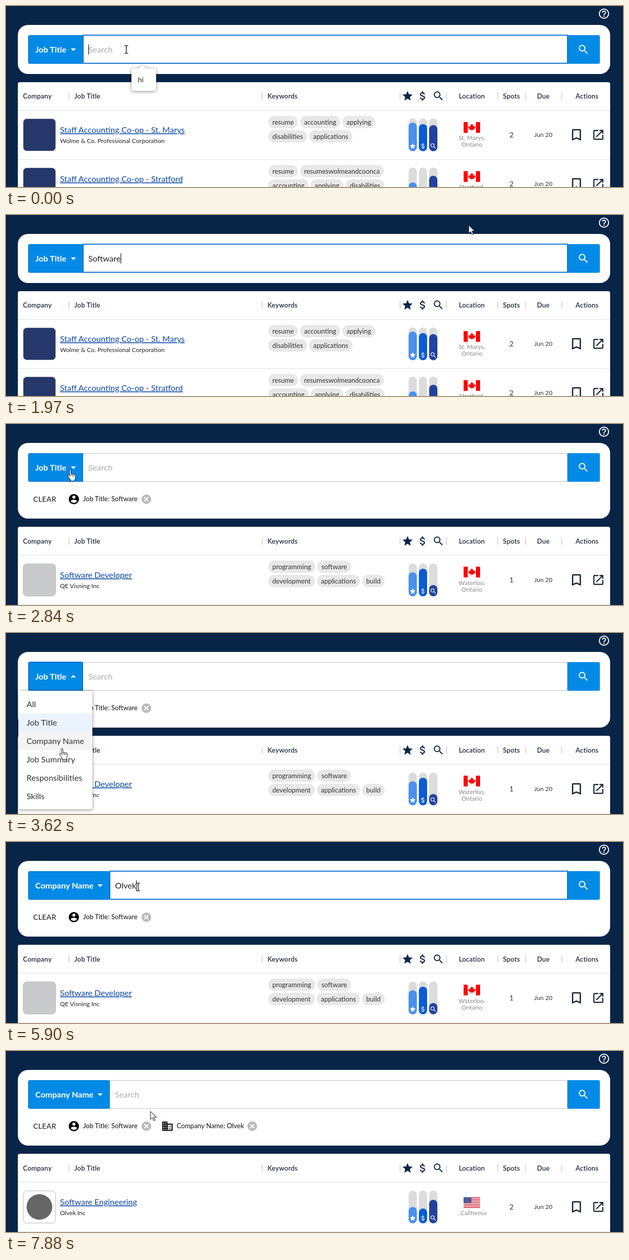
An HTML page for the animation above (8000 ms loop, 1200 px wide and 354 px high).

```html
<!DOCTYPE html>
<html lang="en">
<head>
<meta charset="utf-8">
<title>Job search</title>
<style>
  html, body { margin: 0; width: 100%; height: 100%; overflow: hidden; background: #082548; }
  svg { display: block; font-family: Lato, sans-serif; }
  .pop { filter: drop-shadow(0 1px 3px #0007); }
</style>
</head>
<body>
<svg id="stage" width="1200" height="354" viewBox="0 0 1200 354"></svg>
<script>
const LOOP = 8000, NAVY = '#082548', BLUE = '#028ae6', FOCUS = '#1976d2';
const stage = document.getElementById('stage');
const pen = document.createElement('canvas').getContext('2d');

// Icons on a 24 x 24 grid
const ICONS = {
  star: '<path d="M12 17.27 18.18 21l-1.64-7.03L22 9.24l-7.19-.61L12 2 9.19 8.63 2 9.24l5.46 4.73L5.82 21z"/>',
  dollar: '<path d="M11.8 10.9c-2.27-.59-3-1.2-3-2.15 0-1.09 1.01-1.85 2.7-1.85 1.78 0 2.44.85 2.5 2.1h2.21c-.07-1.72-1.12-3.3-3.21-3.81V3h-3v2.16c-1.94.42-3.5 1.68-3.5 3.61 0 2.31 1.91 3.46 4.7 4.13 2.5.6 3 1.48 3 2.41 0 .69-.49 1.79-2.7 1.79-2.06 0-2.87-.92-2.98-2.1h-2.2c.12 2.19 1.76 3.42 3.68 3.83V21h3v-2.15c1.95-.37 3.5-1.5 3.5-3.55 0-2.84-2.43-3.81-4.7-4.4z"/>',
  search: '<path d="M14.2 14.2 19.8 19.8M15 9.5a5.5 5.5 0 1 1-11 0a5.5 5.5 0 0 1 11 0z" fill="none" stroke="currentColor" stroke-width="2"/>',
  help: '<circle cx="12" cy="12" r="9" fill="none" stroke="currentColor" stroke-width="2"/><path d="M11 18h2v-2h-2zM12 6c-2.21 0-4 1.79-4 4h2c0-1.1.9-2 2-2s2 .9 2 2c0 2-3 1.75-3 5h2c0-2.25 3-2.5 3-5 0-2.21-1.79-4-4-4z"/>',
  bookmark: '<path d="M6 19.5V5q0-1 1-1h10q1 0 1 1v14.5l-6-2.6z" fill="none" stroke="currentColor" stroke-width="2"/>',
  open: '<path d="M12 4H5q-1 0-1 1v14q0 1 1 1h14q1 0 1-1v-7M14 4h6v6M20 4 8.5 15.5" fill="none" stroke="currentColor" stroke-width="2"/>',
  person: '<path fill-rule="evenodd" d="M12 2a10 10 0 1 0 0 20a10 10 0 0 0 0-20zm0 3a3 3 0 1 1 0 6a3 3 0 0 1 0-6zm0 14.2c-2.5 0-4.71-1.28-6-3.22.03-1.99 4-3.08 6-3.08s5.97 1.09 6 3.08c-1.29 1.94-3.5 3.22-6 3.22z"/>',
  office: '<path d="M2 3h10v4h10v14H2z"/><path d="M5 5v14M9 5v14" stroke="#fff" stroke-width="2" stroke-dasharray="2"/><path d="M12 9h8v10h-8v-2h2v-2h-2v-2h2v-2h-2z" fill="#fff"/><path d="M16 11h2v2h-2zm0 4h2v2h-2z"/>',
  cancel: '<circle cx="12" cy="12" r="9.3"/><path d="m8 8 8 8m0-8-8 8" stroke="#fff" stroke-width="2"/>',
  down: '<path d="m7 10 5 5 5-5z"/>',
  up: '<path d="m7 14 5-5 5 5z"/>'
};

const CURSORS = {
  beam: '<path d="M-3.5-7.5h3M.5-7.5h3M0-7V7M-3.5 7.5h3M.5 7.5h3" stroke="#111" stroke-width="1.4"/>',
  hand: '<path d="M-1.5 1c0-2 3-2 3 0v7c0-1 3-1.2 3 .4 0-1 2.8-1 2.8.6 0-1 2.8-.8 2.8 1v4c0 3-1.5 4-1.5 6.5v1h-8v-1.5c0-2-3.6-5-5.6-8.5-.8-1.8 1.4-2.4 2.4-1.2l1.1 1.5z" fill="#fff" stroke="#111"/><path d="M1.5 8v4M4.5 9v3.5M7.3 9.5v3" stroke="#111"/>',
  arrow: '<path d="M0 0v16l3.8-3.6 2.7 6 2.4-1-2.6-6h5z" fill="#fff" stroke="#111"/>'
};

// time, cursor, x, y
const MOVES = [
  [0, 'beam', 234, 85], [1700, 'beam', 500, 72], [1840, 'arrow', 900, 20], [1980, 'arrow', 1090, 8],
  [2120, 'hand', 1119, 90], [2400, 'hand', 1110, 92], [2540, 'beam', 860, 93], [2680, 'beam', 430, 94],
  [2820, 'hand', 125, 90], [3090, 'hand', 122, 130], [3230, 'hand', 124, 174], [3350, 'hand', 121, 190],
  [3480, 'hand', 114, 211], [3620, 'hand', 109, 226], [3930, 'hand', 112, 215], [4190, 'arrow', 150, 170],
  [4320, 'beam', 225, 105], [4460, 'beam', 257, 92], [5900, 'beam', 257, 88], [6020, 'beam', 257, 83],
  [6290, 'beam', 420, 66], [6425, 'arrow', 800, 18], [6560, 'hand', 1122, 70], [6695, 'hand', 1130, 75],
  [7080, 'arrow', 1168, 30], [7220, 'arrow', 1030, 5], [7340, 'arrow', 860, 0], [7480, 'arrow', 640, 12],
  [7610, 'beam', 470, 66], [7750, 'beam', 340, 98], [7880, 'arrow', 281, 118]
];
// time, ripple centre, radius
const RIPPLES = [[0, 0, 0, 0], [2120, 1119, 89, 13], [2270, 1120, 80, 44], [2400, 0, 0, 0],
  [6695, 1130, 76, 14], [6830, 1120, 72, 44], [6950, 0, 0, 0]];
const WORDS = [
  { text: 'Software', keys: [280, 430, 580, 730, 1160, 1280, 1420, 1560], end: 2120 },
  { text: 'Olvek', keys: [4870, 5000, 5120, 5250, 5500], end: 6695 }
];
const MENU = ['All', 'Job Title', 'Company Name', 'Job Summary', 'Responsibilities', 'Skills'];

const FIRM = 'Wolme &amp; Co. Professional Corporation';
const STAFF = [
  { title: 'Staff Accounting Co-op - St. Marys', firm: FIRM, logo: '#25376b', bars: [56, 53, 51], spots: 2,
    tags: [['resume', 'accounting', 'applying'], ['disabilities', 'applications']], place: ['St. Marys,', 'Ontario'] },
  { title: 'Staff Accounting Co-op - Stratford', firm: FIRM, logo: '#25376b', bars: [35, 22, 48], spots: 2,
    tags: [['resume', 'resumeswolmeandcoonca'], ['accounting', 'applying', 'disabilities']], place: ['Stratford,', 'Ontario'] }
];
const DEVELOPER = [{ title: 'Software Developer', firm: 'QE Visning Inc', logo: '#c9cacc', bars: [47, 54, 22], spots: 1,
  tags: [['programming', 'software'], ['development', 'applications', 'build']], place: ['Waterloo,', 'Ontario'] }];
const ENGINEER = [{ title: 'Software Engineering', firm: 'Olvek Inc', logo: '#fff', dot: '#666', bars: [32, 29, 46], spots: 2,
  tags: [], place: [', California'], us: true }];

const latest = (list, t) => list.filter(k => k[0] <= t).pop();
const textWidth = (s, size) => (pen.font = `${size}px Lato, sans-serif`, pen.measureText(s).width);
const rect = (x, y, w, h, fill, r = 0, more = '') =>
  `<rect x="${x}" y="${y}" width="${w}" height="${h}" rx="${r}" fill="${fill}" ${more}/>`;
const text = (x, y, s, size, fill = '#222', more = '') =>
  `<text x="${x}" y="${y}" font-size="${size}" fill="${fill}" ${more}>${s}</text>`;
const mid = (x, y, s, size, fill, more = '') => text(x, y, s, size, fill, 'text-anchor="middle" ' + more);
const at = (x, y, body) => `<g transform="translate(${x} ${y})">${body}</g>`;
const icon = (name, x, y, size, color) =>
  `<g transform="translate(${x - size / 2} ${y - size / 2}) scale(${size / 24})" fill="${color}" color="${color}">${ICONS[name]}</g>`;

function canada() {
  const half = 'd="M0-7.5 1.5-4.6 3.2-5.4 2.5-1 4.6-3 5-1.8 7-2.2 6.3 0 7.2.8 3.6 3.7 3.9 5 .4 4.6V7.5H0z" fill="#f00"';
  return rect(0, 0, 32, 21, '#fff') + rect(0, 0, 8, 21, '#f00') + rect(24, 0, 8, 21, '#f00') +
    at(16, 10.5, `<path ${half}/><path ${half} transform="scale(-1 1)"/>`);
}

function states() {
  const h = 21 / 13;
  let out = rect(0, 0, 32, 21, '#fff');
  for (let i = 0; i < 13; i += 2) out += rect(0, i * h, 32, h, '#d3243c');
  out += rect(0, 0, 15, 7 * h, '#2e3f86');
  for (let i = 0; i < 20; i++)
    out += `<circle cx="${1.8 + i % 5 * 2.8}" cy="${1.7 + (i / 5 | 0) * 2.6}" r=".6" fill="#fff"/>`;
  return out;
}

function tagLine(tags, y) {
  let x = 510;
  return tags.map(tag => {
    const w = textWidth(tag, 13) + 16;
    const out = rect(x, y - 12, w, 24, '#e8e8e8', 12) + text(x + 8, y + 4.5, tag, 13, '#333');
    x += w + 4;
    return out;
  }).join('');
}

// "lift" raises the keywords and flag inside the row
function row(job, y, lift) {
  const top = y + 15, bars = [['star', '#4a90ee'], ['dollar', '#0a5bd6'], ['search', '#20439f']];
  let out = rect(33.5, top + .5, 63, 63, job.logo, 7, 'stroke="#bbb"');
  if (job.dot) out += `<circle cx="65" cy="${top + 32}" r="25" fill="${job.dot}"/>`;
  out += text(105, y + 43, job.title, 16, '#0b48a6', 'text-decoration="underline"') + text(105, y + 63, job.firm, 12);
  job.tags.forEach((line, i) => out += tagLine(line, y - lift + 22 + i * 28));
  bars.forEach(([name, color], i) => {
    const x = 783 + i * 20, h = job.bars[i];
    out += rect(x, top, 16, 64, '#dcdcdc', 8) + rect(x, top + 64 - h, 16, h, color, 8) +
      icon(name, x + 8, top + 54, 14, '#fff');
  });
  const one = job.place.length < 2;
  out += at(890, y - lift + (one ? 29 : 22), job.us ? states() : canada());
  job.place.forEach((s, i) => out += mid(906, y + (one ? 63 : 57) + i * 13, s, 12, '#888'));
  return out + mid(983, y + 52, job.spots, 14, '#333') + mid(1045, y + 51, 'Jun 20', 12, '#333') +
    icon('bookmark', 1109.5, y + 47, 30, '#111f33') + icon('open', 1152, y + 47, 26, '#111f33') +
    rect(23, y + 95, 1152, 1, '#e0e0e0');
}

function table(t, chips) {
  const top = chips ? 201 : 149, y = chips ? 229 : 176, fresh = t >= 2400;
  const style = 'font-weight="600" letter-spacing=".2"', ink = '#1d2b3e';
  let out = rect(23, top, 1152, 300, '#fff', 4) + rect(23, top + 55, 1152, 1, '#e0e0e0');
  for (const x of [122, 498, 766, 856, 956, 1010, 1080]) out += rect(x - .5, y - 7, 2, 14, '#d9d9d9');
  [[33, 'Company'], [133, 'Job Title'], [508.5, 'Keywords']].forEach(([x, s]) => out += text(x, y + 5, s, 13, ink, style));
  [[906, 'Location'], [983, 'Spots'], [1045, 'Due'], [1130, 'Actions']].forEach(([x, s]) => out += mid(x, y + 5, s, 13, ink, style));
  out += icon('star', 781, y, 24, NAVY) + icon('dollar', 810.5, y, 24, NAVY) + icon('search', 841, y, 24, NAVY);
  const jobs = t >= 6950 ? ENGINEER : fresh ? DEVELOPER : STAFF;
  jobs.forEach((job, i) => out += row(job, top + 56 + fresh + i * 96, +fresh));
  return out;
}

function filters(t) {
  const chip = (name, x, s, end) => icon(name, x, 147, 24, '#000') + text(x + 18, 151, s, 13, '#111') + icon('cancel', end, 147, 24, '#bababa');
  return text(53, 152, 'CLEAR', 14, '#111', 'letter-spacing=".4"') + chip('person', 132, 'Job Title: Software', 273) +
    (t >= 6695 ? chip('office', 314, 'Company Name: Olvek', 479) : '');
}

function searchBar(t, open) {
  const byFirm = t >= 4060, shift = byFirm ? 52 : 0, x = 149 + shift;
  const focus = t < 2120 || t >= 4460 && t < 6695;
  const word = WORDS[byFirm ? 1 : 0];
  const typed = t < word.end ? word.text.slice(0, word.keys.filter(k => k <= t).length) : '';
  const [, rx, ry, r] = latest(RIPPLES, t);
  let out = rect(43, 57, 130, 56, BLUE, 4) + rect(43.5, 57.5, 106 + shift, 55, BLUE, 3, 'stroke="#0b74c9"');
  if (open) out += rect(44, 57, 105, 55, 'none', 3, `stroke="${FOCUS}" stroke-width="2"`);
  out += rect(1091, 57, 64, 56, BLUE, 3);
  out += focus ? rect(x + 1, 57, 942 - shift, 55, '#fff', 0, `stroke="${FOCUS}" stroke-width="2"`)
    : rect(x + .5, 57.5, 942 - shift, 55, '#fff', 0, 'stroke="#c2c2c2"') + rect(x, 57, 1, 56, '#0b74c9');
  out += text(57, 91, byFirm ? 'Company Name' : 'Job Title', 16, '#fff', 'font-weight="700"') +
    icon(open ? 'up' : 'down', 131 + shift, 85, 24, '#fff');
  out += typed ? text(160 + shift, 91, typed, 16) : text(160 + shift, 91, 'Search', 16, '#aaa');
  if (focus) out += rect(160 + shift + Math.round(textWidth(typed, 16)), 75, 1, 20, '#000');
  out += icon('search', 1123, 85, 24, '#fff');
  if (r) out += `<clipPath id="button">${rect(1091, 57, 64, 56, '#fff', 3)}</clipPath>` +
    `<circle cx="${rx}" cy="${ry}" r="${r}" fill="#fff" opacity=".15" clip-path="url(#button)"/>`;
  if (t < 280 || t >= 4590 && t < 4870)
    out += at(shift, 0, `<g class="pop"><path d="M248 122h10l7-7 7 7h16q4 0 4 4v36q0 4-4 4h-40q-4 0-4-4v-36q0-4 4-4z" fill="#fff"/></g>` +
      text(256.5, 149, 'hi', 14));
  return out;
}

function menu(y) {
  const hover = Math.floor((y - 121) / 36);
  return `<g class="pop">${rect(24, 113, 144, 232, '#fff', 4)}</g>` + MENU.map((s, i) => {
    const fill = i === 1 ? '#ebf3fd' : i === hover ? '#f4f4f4' : '#fff';
    return rect(24, 121 + i * 36, 144, 36, fill) + text(40, 145 + i * 36, s, 16, '#333');
  }).join('');
}

function scene(t) {
  const chips = t >= 2120, open = t >= 2960 && t < 4060;
  const [, shape, x, y] = latest(MOVES, t);
  return icon('help', 1163, 15, 24, '#fff') + rect(23, 37, 1152, chips ? 148 : 96, '#fff', 20) +
    table(t, chips) + (chips ? filters(t) : '') + searchBar(t, open) + (open ? menu(y) : '') + at(x, y, CURSORS[shape]);
}

let shown = '';
function tick() {
  const next = scene(performance.now() % LOOP);
  if (next !== shown) stage.innerHTML = shown = next;
  requestAnimationFrame(tick);
}
tick();
</script>
</body>
</html>
```
